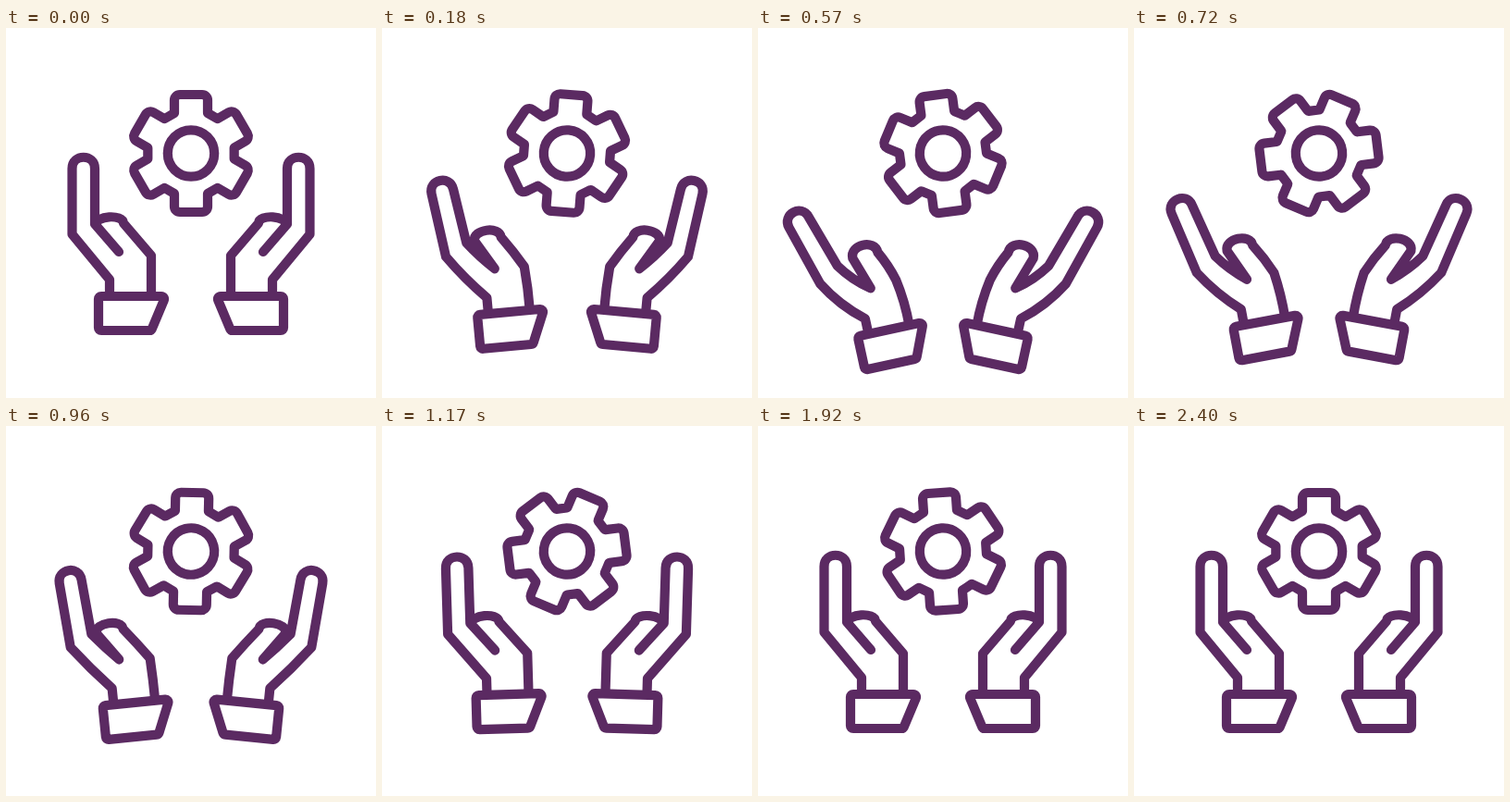
Write an HTML page with a canvas that moves like this. It is 400 px wide and 400 px high and loops after 4.43 s.

```html
<!DOCTYPE html>
<html lang="en">
<head>
<meta charset="utf-8">
<title>Gear and hands</title>
<style>
  html, body { margin: 0; width: 100%; height: 100%; overflow: hidden; background: #fff; }
  canvas { display: block; width: 400px; height: 400px; }
</style>
</head>
<body>
<canvas id="stage" width="400" height="400"></canvas>
<script>
const ctx = document.getElementById('stage').getContext('2d');
const LOOP = 4430, ACTIVE = 2400, STEP = 30;
const INK = '#5b2a62';
const PIVOT = { x: 132, y: 236 };

const rad = deg => deg * Math.PI / 180;
const mix = (a, b, k) => a + (b - a) * k;
const smooth = u => (1 - Math.cos(Math.PI * Math.min(1, Math.max(0, u)))) / 2;

// Rises to 1 by `top`, stays until `hold`, is back at 0 by `end`.
const swing = (t, top, hold, end) =>
  smooth(t / top) - smooth((t - hold) / (end - hold));

// Cubic Bezier easing, solved by bisection.
function bezier(x, x1, y1, x2, y2) {
  const at = (s, a, b) => 3 * s * (1 - s) ** 2 * a + 3 * s * s * (1 - s) * b + s ** 3;
  let lo = 0, hi = 1;
  for (let n = 0; n < 30; n++) {
    const s = (lo + hi) / 2;
    if (at(s, x1, x2) < x) lo = s;
    else hi = s;
  }
  return at(hi, y1, y2);
}

// A pen that bends its edges and caps sideways from the line it draws.
function makePen(open) {
  let x = 0, y = 0;
  const place = (px, py, sx, sy) => [px + sx * open, py + sy * open];
  return {
    start(px, py) {
      [x, y] = [px, py];
      ctx.beginPath();
      ctx.moveTo(x, y);
    },
    edge(px, py, sx = 0, sy = 0, bend = 0) {
      const [qx, qy] = place(px, py, sx, sy), b = bend * open;
      ctx.quadraticCurveTo((x + qx) / 2 - (qy - y) * b, (y + qy) / 2 + (qx - x) * b, qx, qy);
      [x, y] = [qx, qy];
    },
    cap(px, py, sx, sy, height) {
      const [qx, qy] = place(px, py, sx, sy);
      const nx = -(qy - y) * height, ny = (qx - x) * height;
      ctx.bezierCurveTo(x + nx, y + ny, qx + nx, qy + ny, qx, qy);
      [x, y] = [qx, qy];
    }
  };
}

function roundPoly(pts, radius) {
  const a = pts[pts.length - 1], b = pts[0];
  ctx.beginPath();
  ctx.moveTo((a[0] + b[0]) / 2, (a[1] + b[1]) / 2);
  pts.forEach((p, i) => {
    const q = pts[(i + 1) % pts.length];
    ctx.arcTo(p[0], p[1], q[0], q[1], radius(i));
  });
  ctx.closePath();
  ctx.stroke();
}

function drawGear(angle) {
  const pts = [];
  for (let k = 0; k < 6; k++) {
    const c = Math.cos(rad(60 * k)), s = Math.sin(rad(60 * k));
    for (const [x, y] of [[-18, -43.5], [-18, -63.5], [18, -63.5], [18, -43.5]])
      pts.push([x * c - y * s, x * s + y * c]);
  }
  ctx.save();
  ctx.translate(200, 135.5);
  ctx.rotate(rad(angle));
  roundPoly(pts, i => i % 4 === 1 || i % 4 === 2 ? 6 : 1);
  ctx.beginPath();
  ctx.arc(0, 0, 25.2, 0, 2 * Math.PI);
  ctx.stroke();
  ctx.restore();
}

function drawHand(open, turn) {
  ctx.save();
  ctx.translate(PIVOT.x - 4.8 * open, PIVOT.y + 41.5 * open);
  ctx.rotate(rad(-turn));
  ctx.translate(-PIVOT.x, -PIVOT.y);

  const pen = makePen(open);
  pen.start(157, 290);
  // thumb
  pen.edge(157, 246, -4, -8, 0.06);
  pen.edge(127, 211, 14.7, -5.7, 0.06);
  pen.cap(97, 213, 17, -7.5, mix(0.34, 0.56, open));
  pen.edge(122, 242, 3, 0);
  // finger
  pen.edge(96, 212, -1.4, -1.4, -0.1);
  pen.edge(96, 152, -22.5, 0.4);
  pen.cap(71.5, 152, -21, 7.8, 2 / 3);
  // palm
  pen.edge(71.5, 223, 1, 3);
  pen.edge(112, 272, 0, 1, 0.1);
  pen.edge(112, 290);
  ctx.stroke();

  roundPoly([[100, 290], [172.5, 290], [157, 327], [100, 327]], () => 3);
  ctx.restore();
}

function render(t) {
  ctx.fillStyle = '#fff';
  ctx.fillRect(0, 0, 400, 400);
  ctx.strokeStyle = INK;
  ctx.lineWidth = 10.2;
  ctx.lineJoin = 'round';

  const open = swing(t, 400, 420, 1210);
  const turn = 12.4 * swing(t, 400, 500, 1380);
  drawHand(open, turn);
  ctx.save();
  ctx.translate(400, 0);
  ctx.scale(-1, 1);
  drawHand(open, turn);
  ctx.restore();

  drawGear(180 * bezier(t / ACTIVE, 0.35, 0.03, 0.17, 1));
}

function tick() {
  const t = performance.now() % LOOP;
  render(Math.min(ACTIVE, Math.floor(t / STEP) * STEP));
  requestAnimationFrame(tick);
}
tick();
</script>
</body>
</html>
```
